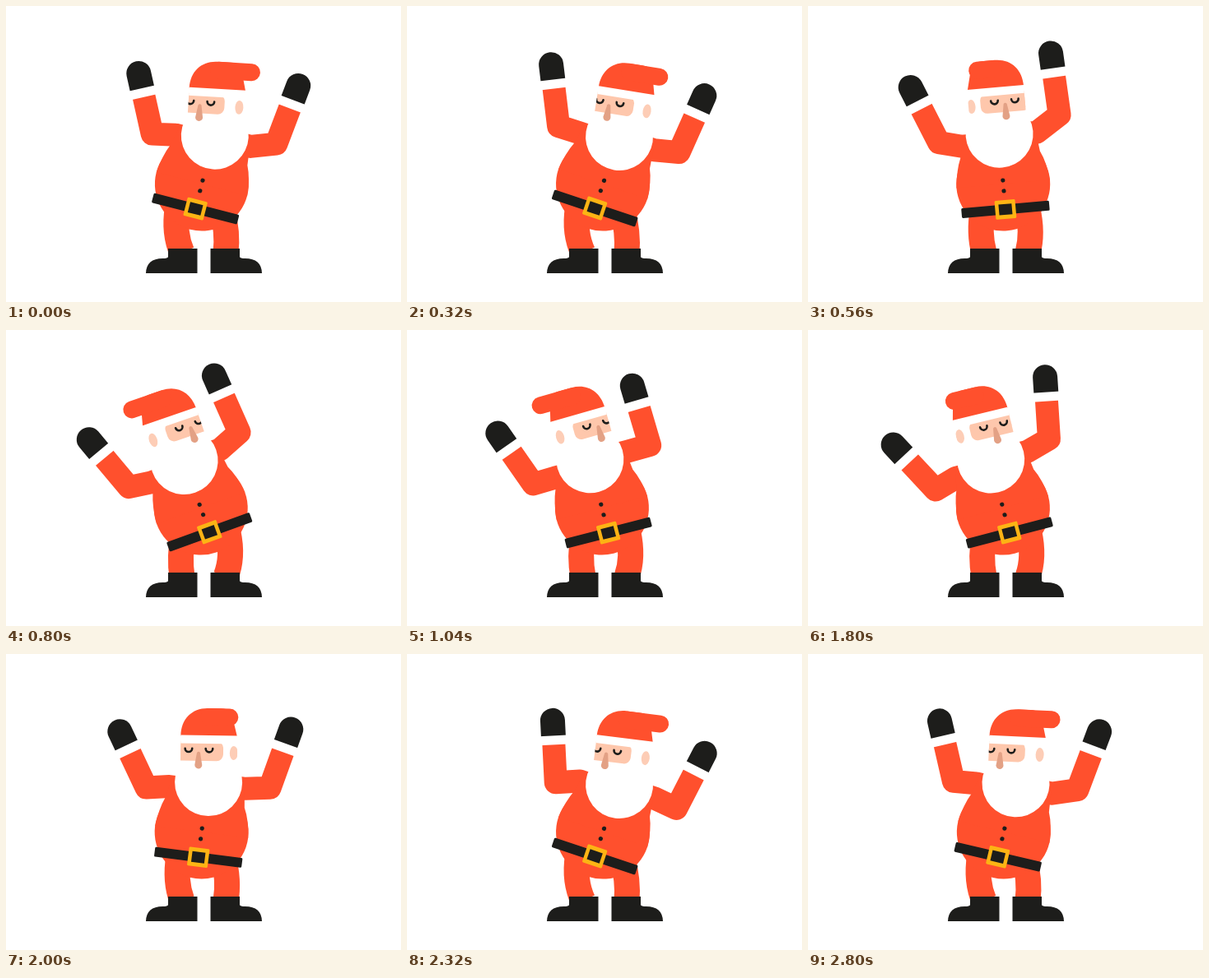
Recreate the animation shown at these times as an HTML page with a canvas. Size 480x360 px, loop 2.84 s.

```html
<!DOCTYPE html>
<html lang="en">
<head>
<meta charset="utf-8">
<title>Dancing Santa</title>
<style>
html, body { margin: 0; width: 100%; height: 100%; overflow: hidden; background: #fff; }
canvas { display: block; width: 480px; height: 360px; }
</style>
</head>
<body>
<canvas id="stage" width="480" height="360"></canvas>
<script>
const ctx = document.getElementById('stage').getContext('2d');
const LOOP = 2840, HALF = LOOP / 2, STEP = 40;
const RED = '#ff502d', BLACK = '#1d1d1b', WHITE = '#fff', GOLD = '#fdb414';
const SKIN = '#fec7ac', EAR = '#fdcdb6', NOSE = '#e3a185';
const RAD = Math.PI / 180;

// Half-cycle keys: the second half is the same with the sign flipped.
const LEAN = [[-188, 11], [255, 20], [780, -20], [1232, -11], [1675, -20]];
const TURN = [[-710, -1], [260, -1], [710, 1], [1680, 1]];

// Free keys over the whole loop.
const TIMES = [0, 260, 560, 790, 1040, 1520, 1690, 2000, 2320, 2640, 2800];
const HEAD = [-11, -11, 0, 1, -1.4, 4.7, 4.7, -6.5, -11.4, -11, -10.7];
const LEFT_ELBOW = [-46, -50, -59, -56, -51, -42, -42, -47, -41, -49, -48];
const LEFT_FORE = [-27, -26, -22, -20, -20.4, -29.3, -26, -32.5, -21.4, -27, -26.2];
const RIGHT_ELBOW = [-72, -66, -80, -73, -61.5, -68, -70, -66, -57.5, -73, -72.7];
const RIGHT_FORE = [6.3, 7, -3, -4, -2, 10.2, 10, 12.5, 8.6, 6.5, 7.3];

function swing(keys, t) {
  const flip = t >= HALF ? -1 : 1;
  const u = t % HALF;
  let i = 0;
  while (i < keys.length - 2 && u >= keys[i + 1][0]) i++;
  const [t0, a] = keys[i], [t1, b] = keys[i + 1];
  return flip * (a + (b - a) * (1 - Math.cos(Math.PI * (u - t0) / (t1 - t0))) / 2);
}

// Periodic smooth curve through the free keys.
function curve(vals, t) {
  const n = TIMES.length;
  const time = k => TIMES[(k + n) % n] + Math.floor(k / n) * LOOP;
  const val = k => vals[(k + n) % n];
  const slope = k => (val(k + 1) - val(k - 1)) / (time(k + 1) - time(k - 1));
  let i = n - 1;
  while (TIMES[i] > t) i--;
  const d = time(i + 1) - time(i), s = (t - time(i)) / d, r = 1 - s;
  return val(i) * r * r * (1 + 2 * s) + val(i + 1) * s * s * (3 - 2 * s)
    + d * s * r * (slope(i) * r - slope(i + 1) * s);
}

function fill(color, d) {
  ctx.fillStyle = color;
  ctx.fill(new Path2D(d));
}

function stroke(color, width, d, cap = 'butt') {
  ctx.strokeStyle = color;
  ctx.lineWidth = width;
  ctx.lineCap = cap;
  ctx.lineJoin = 'round';
  ctx.stroke(new Path2D(d));
}

function oval(color, x, y, rx, ry = rx) {
  ctx.fillStyle = color;
  ctx.beginPath();
  ctx.ellipse(x, y, rx, ry, 0, 0, 7);
  ctx.fill();
}

function box(color, x, y, w, h, r = 0) {
  ctx.fillStyle = color;
  ctx.beginPath();
  ctx.roundRect(x, y, w, h, r);
  ctx.fill();
}

// Draws in a frame moved to x, y and turned by deg.
function at(x, y, deg, draw) {
  ctx.save();
  ctx.translate(x, y);
  ctx.rotate(deg * RAD);
  draw();
  ctx.restore();
}

function legs(lean) {
  for (const side of [-1, 1]) {
    const hip = 238.5 + side * 27 - lean * 0.22;
    const foot = 240.5 + side * 26.5;
    const knee = 239.5 + side * 30 - lean * 0.15;
    const bend = 2 * knee - (hip + foot) / 2;
    stroke(RED, 31, `M${hip} 246Q${bend} 276 ${foot} 300`);
    ctx.save();
    ctx.translate(240.5, 0);
    ctx.scale(side, 1);
    fill(BLACK, 'M8 295H43.5V305Q44 307 50 307Q70 307 70.5 325H8Z');
    ctx.restore();
  }
}

function arm(shoulder, elbow, fore) {
  const [sx, sy] = shoulder, [ex, ey] = elbow;
  const tx = ex + 47 * Math.sin(fore * RAD), ty = ey - 47 * Math.cos(fore * RAD);
  stroke(RED, 28, `M${sx * 0.6} ${sy}L${sx} ${sy}L${ex} ${ey}L${tx} ${ty}`);
  at(ex, ey, fore, () => {
    box(BLACK, -15, -90.5, 30, 36, [15, 15, 0, 0]);
    box(WHITE, -17, -57, 34, 11);
  });
}

function torso() {
  oval(RED, 0, -2, 57);
  fill(RED, 'M-44 -62L-49 -38Q-55 -24 -57 -2H57Q55 -24 48 -38L44 -70Z');
  oval(BLACK, 0, -6.5, 2.6);
  oval(BLACK, 0, 6.5, 2.6);
  box(BLACK, -53.5, 23, 107, 12, 1.5);
  box(GOLD, -12.5, 17.5, 25, 23, 1.5);
  box(BLACK, -8, 22.5, 16, 13);
}

function hat(turn) {
  ctx.save();
  ctx.scale(turn < 0 ? 1 : -1, 1);
  fill(RED, 'M-34.5 -56C-34.5 -77 -21 -90 -2 -90H14Q27 -90 28 -80L34 -56Z');
  stroke(RED, 21, `M0 -79.5H${40 * Math.abs(turn)}`, 'round');
  ctx.restore();
}

function head(turn) {
  const nose = 20.5 * turn;
  oval(WHITE, 0, 0, 41);
  ctx.save();
  ctx.beginPath();
  ctx.rect(-34.5, -58, 69, 48);
  ctx.clip();
  box(WHITE, -34.5, -58, 69, 38);
  for (const side of [-1, 1]) oval(EAR, side * 34.5 + 7 * turn, -36, 5, 8.5);
  box(SKIN, nose - 30, -50, 60, 24, 8);
  for (const side of [-1, 1]) {
    stroke(BLACK, 2.6, `M${nose * 0.97 + side * 12.5 - 4.3} -41a4.3 4.3 0 0 0 8.6 0`, 'round');
  }
  fill(NOSE, `M${nose - 2} -36q2 -2.5 4 0l2.5 15a4.5 4.5 0 0 1 -9 0Z`);
  ctx.restore();
  hat(turn);
  box(WHITE, -34.5, -57, 69, 10);
}

function draw(t) {
  const lean = swing(LEAN, t), turn = swing(TURN, t);
  ctx.fillStyle = WHITE;
  ctx.fillRect(0, 0, 480, 360);
  legs(lean);
  at(237.4, 218.5, lean, () => {
    arm([-46, -52], [-73.5, curve(LEFT_ELBOW, t)], curve(LEFT_FORE, t));
    arm([46, -61], [75.5, curve(RIGHT_ELBOW, t)], curve(RIGHT_FORE, t));
    torso();
    at(0.7, -63, curve(HEAD, t), () => head(turn));
  });
}

const start = performance.now();
function tick() {
  const t = (performance.now() - start) % LOOP;
  draw(Math.floor(t / STEP) * STEP);
  requestAnimationFrame(tick);
}
tick();
</script>
</body>
</html>
```
